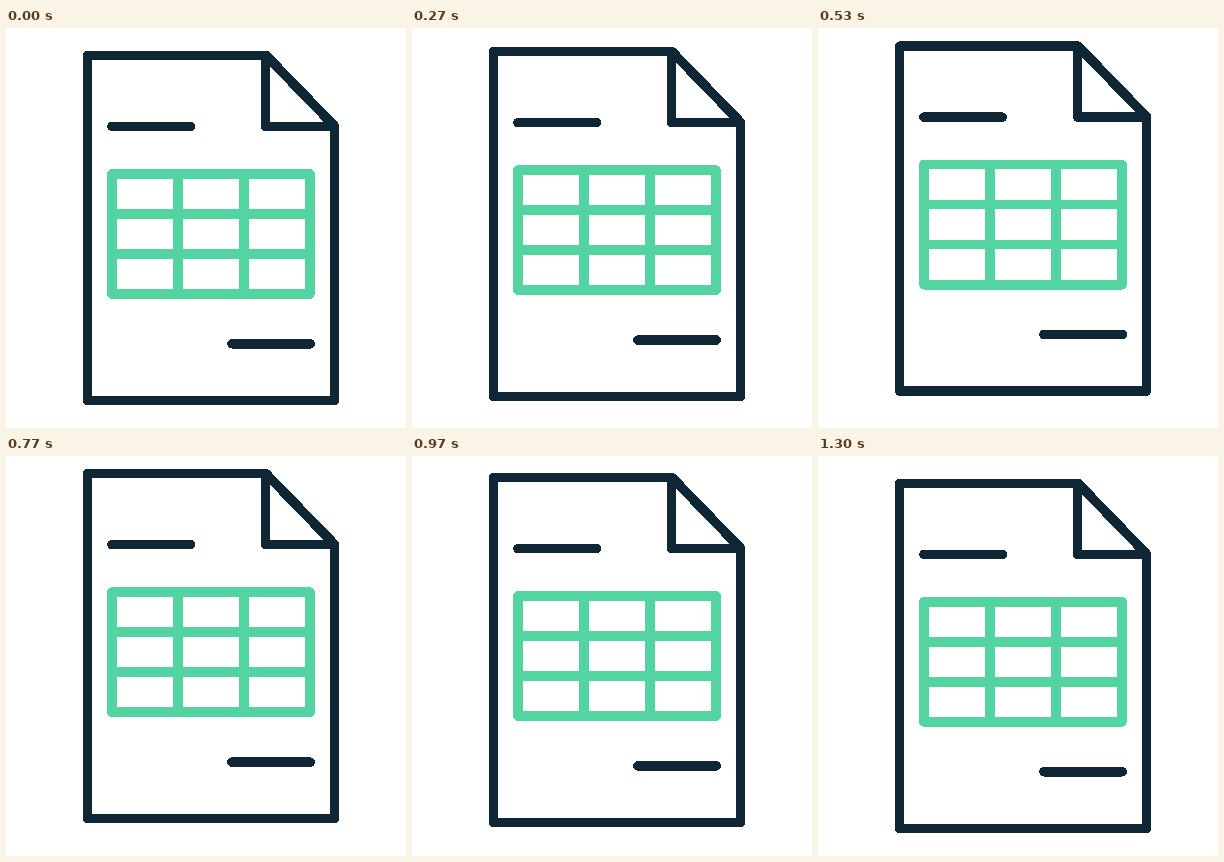
Animation of 400 by 400 pixels, one loop 1.33 s. Source, as an HTML page without scripts:

```html
<!DOCTYPE html>
<html lang="en">
<head>
<meta charset="utf-8">
<title>Floating spreadsheet</title>
<style>
  html, body { margin: 0; width: 100%; height: 100%; overflow: hidden; background: #fff; }
  svg { display: block; width: 100%; height: 100%; }
  g { fill: none; stroke-width: 9.6; stroke-linecap: round; stroke-linejoin: round; shape-rendering: crispEdges; }
  .page { stroke: #0f2735; }
  .table { stroke: #54d4a2; }
</style>
</head>
<body>
<svg viewBox="0 0 400 400">
  <g>
    <animateTransform attributeName="transform" type="translate" dur="1.3333s" repeatCount="indefinite"
      values="0 0; 0 -10.4; 0 0" keyTimes="0; .5; 1"
      calcMode="spline" keySplines=".333 0 .667 1; .333 0 .667 1"/>
    <g class="table">
      <path d="M106 145.8H304V266H106Z"/>
      <path d="M106 185.8H304M106 225.9H304M172 145.8V266M238 145.8V266"/>
    </g>
    <g class="page">
      <path d="M81.6 27.4H260L328.4 98V372.4H81.6Z"/>
      <path d="M259.6 27.4V98.4H328.4"/>
      <path d="M106 98.4H184.4M226 315.8H304.2"/>
    </g>
  </g>
</svg>
</body>
</html>
```
